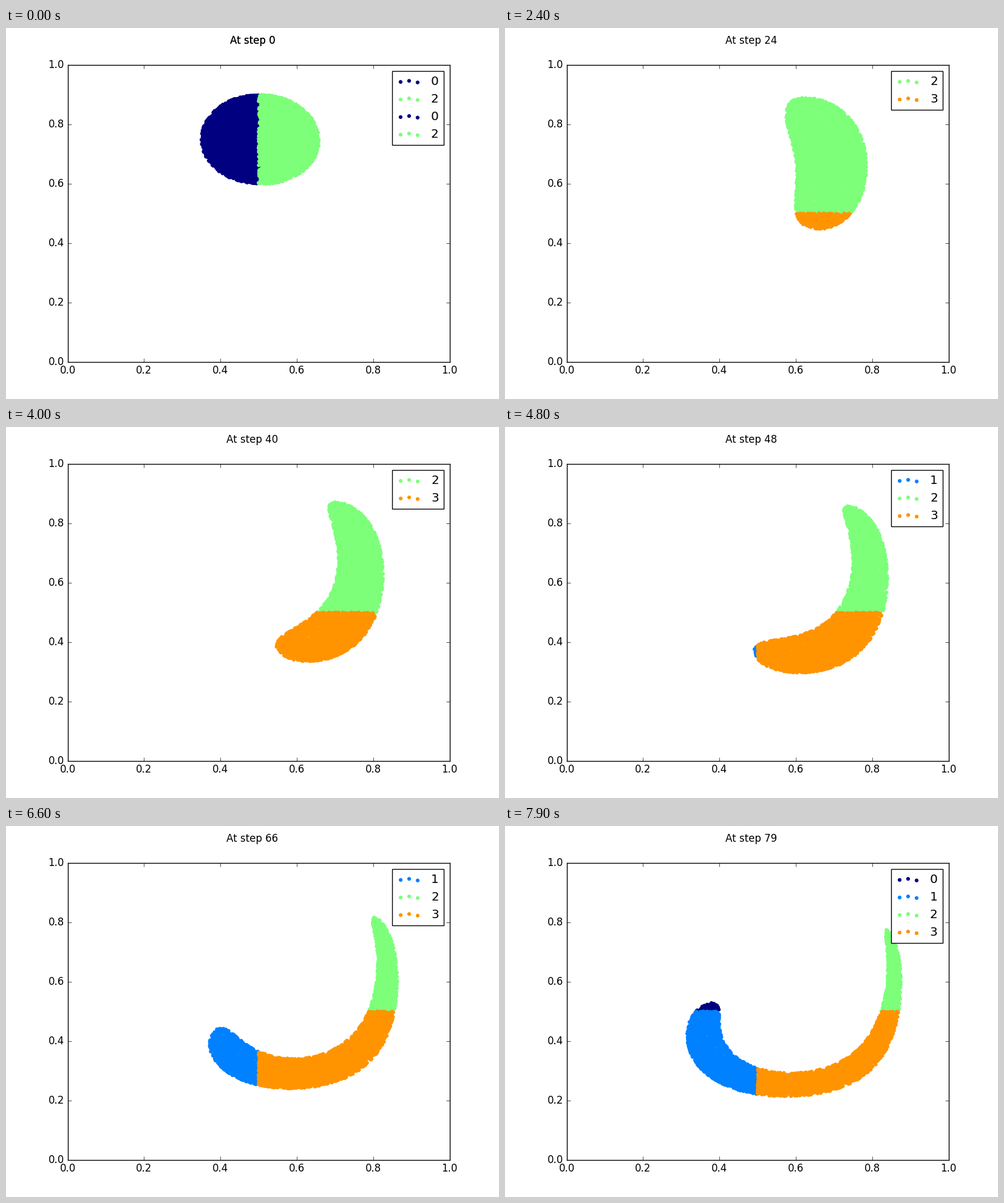
Write a matplotlib script that moves like this. It is 812 px wide and 612 px high and loops after 8000 ms.

```python
import numpy as np
import matplotlib.pyplot as plt
from matplotlib.animation import FuncAnimation

plt.style.use("classic")
plt.rcParams.update({
    "font.family": "DejaVu Sans",
    "figure.facecolor": "white",
    "savefig.facecolor": "white",
    "figure.dpi": 100,
    "savefig.dpi": 100,
})

STEPS = 80
DT = 0.01
COUNT = 5500
COLORS = [plt.cm.jet(k / 4) for k in range(4)]


def velocity(p):
    """Single clockwise vortex in the unit box."""
    x, y = np.pi * p
    return np.array([-np.sin(x) ** 2 * np.sin(2 * y),
                     np.sin(y) ** 2 * np.sin(2 * x)])


def advance(p):
    """One Runge-Kutta step."""
    a = velocity(p)
    b = velocity(p + DT / 2 * a)
    c = velocity(p + DT / 2 * b)
    d = velocity(p + DT * c)
    return p + DT / 6 * (a + 2 * b + 2 * c + d)


def disc(center, radius):
    rng = np.random.default_rng(4)
    r = radius * np.sqrt(rng.random(COUNT))
    angle = 2 * np.pi * rng.random(COUNT)
    return np.array([center[0] + r * np.cos(angle),
                     center[1] + r * np.sin(angle)])


states = [disc((0.5, 0.75), 0.15)]
for _ in range(STEPS):
    states.append(advance(states[-1]))

# The small surplus keeps the pixel size from rounding down.
fig, ax = plt.subplots(figsize=(8.1201, 6.1201), dpi=100)
ax.set_xlim(0, 1)
ax.set_ylim(0, 1)
title = fig.suptitle("", fontsize=12)
title_copy = fig.text(0.5, 0.98, "At step 0", fontsize=12,
                      ha="center", va="top")


def scatter_quadrants(p):
    x, y = p
    quadrant = 2 * (x >= 0.5) + (y < 0.5)
    for q in range(4):
        mask = quadrant == q
        if mask.any():
            ax.scatter(x[mask], y[mask], s=20, color=COLORS[q],
                       edgecolors="none", label=str(q))


def update(step):
    for dots in list(ax.collections):
        dots.remove()
    # The opening picture holds both the initial and the first moved cloud.
    if step == 0:
        scatter_quadrants(states[0])
    scatter_quadrants(states[step + 1])
    ax.legend(loc="upper right", scatterpoints=3)
    ax.set_xlim(0, 1)
    ax.set_ylim(0, 1)
    title.set_text(f"At step {step}")
    title_copy.set_visible(step == 0)
    return []


anim = FuncAnimation(fig, update, frames=STEPS, init_func=lambda: [],
                     interval=100, repeat=True, repeat_delay=0)
plt.show()
```
